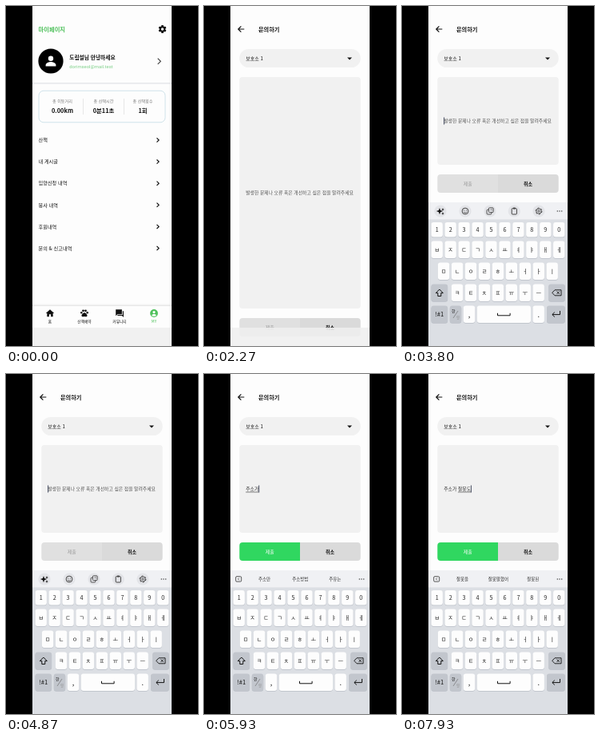
An HTML page for the animation above (8 s loop, 240x426 px).

```html
<!DOCTYPE html>
<html lang="ko">
<head>
<meta charset="utf-8">
<title>문의하기</title>
<style>
html, body { margin: 0; width: 100%; height: 100%; overflow: hidden; background: #000; }
svg { display: block; width: 240px; height: 426px; }
text { font-family: "Noto Sans CJK KR", "Noto Sans CJK JP", "Noto Sans CJK", sans-serif; white-space: pre; }
.latin { font-family: Roboto, "Open Sans", sans-serif; }
</style>
</head>
<body>
<svg id="stage" viewBox="0 0 240 426" xmlns="http://www.w3.org/2000/svg"></svg>
<script>
const LOOP = 8000;
const INK = '#111', GREEN = '#4fc15c', ACTIVE = '#30d760', FIELD = '#f1f1f1';

// ---- drawing helpers ----
const rect = (x, y, w, h, fill, r = 0, more = '') =>
  `<rect x="${x}" y="${y}" width="${w}" height="${h}" rx="${r}" fill="${fill}" ${more}/>`;
const circle = (x, y, r, fill, more = '') =>
  `<circle cx="${x}" cy="${y}" r="${r}" fill="${fill}" ${more}/>`;
const line = (d, color = INK, w = 1, more = '') =>
  `<path d="${d}" fill="none" stroke="${color}" stroke-width="${w}" ${more}/>`;
const shape = (d, fill = INK, more = '') => `<path d="${d}" fill="${fill}" ${more}/>`;
const at = (x, y, body, id = '') => `<g ${id && `id="${id}"`} transform="translate(${x} ${y})">${body}</g>`;
// y is the optical middle of the line
const label = (s, x, y, size, { color = INK, weight = 400, anchor = 'start', id = '', cls = '' } = {}) =>
  `<text ${id && `id="${id}"`} class="${cls}" x="${x}" y="${(y + size * .37).toFixed(2)}" font-size="${size}" ` +
  `fill="${color}" font-weight="${weight}" text-anchor="${anchor}">${s.replace('&', '&amp;')}</text>`;
const mid = (s, x, y, size, o = {}) => label(s, x, y, size, { anchor: 'middle', ...o });
const chevron = (x, y, s = 2.6, w = 1.2, color = INK) =>
  line(`M${x - s / 2} ${y - s}l${s} ${s}l${-s} ${s}`, color, w);
const backArrow = line('M50.3 29H43M46.4 25.4L42.8 29l3.6 3.6', INK, 1.2);
const page = (id, body) => `<g id="${id}">${rect(33, 0, 174, 426, '#fdfdfd')}${body}</g>`;

function gear(x, y) {
  let teeth = '';
  for (let a = 0; a < 360; a += 60)
    teeth += rect(-1.3, -4.9, 2.6, 4, INK, .5, `transform="rotate(${a})"`);
  return at(x, y, teeth + circle(0, 0, 3.7, INK) + circle(0, 0, 1.7, '#fdfdfd'));
}

// ---- pages ----
function homePage() {
  const stats = [['총 이동거리', '0.00km', 70.5], ['총 산책시간', '0분11초', 122], ['총 산책횟수', '1회', 171]];
  const menu = ['산책', '내 게시글', '입양신청 내역', '봉사 내역', '후원내역', '문의 & 신고내역'];
  const home = shape('M0-4.8L5.2 0H3.7V4.2H1.1V1.2H-1.1V4.2H-3.7V0H-5.2z');
  const paw = circle(-3.7, -.7, 1.3, INK) + circle(-1.5, -3.2, 1.4, INK) + circle(1.5, -3.2, 1.4, INK) +
    circle(3.7, -.7, 1.3, INK) + shape('M0-.8C1.6-.8 3.9 1.8 3.5 3.3C3 5 1.2 4 0 4S-3 5-3.5 3.3C-3.9 1.8-1.6-.8 0-.8z');
  const chat = shape('M-4.8-4.7H2.9V1.2H-2.8L-4.8 3.2z') + shape('M3.8-2.8H5V4.9L3 3H-2.7V2H3.8z');
  const me = circle(0, 0, 4.9, GREEN) + circle(0, -1.4, 1.6, '#fdfdfd') + shape('M-3 2.5C-2 .4 2 .4 3 2.5C1.5 4.3-1.5 4.3-3 2.5z', '#fdfdfd');
  const tabs = [['홈', 55, home], ['산책예약', 98, paw], ['커뮤니티', 142, chat], ['MY', 185, me]];

  return page('home',
    label('마이페이지', 40.5, 29, 7.3, { color: GREEN, weight: 700 }) + gear(195.5, 29) +
    circle(56, 69, 15.6, '#000') + circle(56, 65.7, 3.2, '#fff') +
    shape('M49.6 75.6V74c0-2.6 4.2-3.9 6.4-3.9s6.4 1.3 6.4 3.9v1.6z', '#fff') +
    label('도림설님 안녕하세요', 79.3, 64.6, 6.7, { weight: 700 }) +
    label('dorimseol@mail.test', 79.3, 75.4, 5.9, { color: '#7fd08a', cls: 'latin' }) +
    chevron(191.5, 69.3, 3.6, 1.2, '#444') +
    rect(33, 96.4, 174, 1, '#d9dde2') +
    rect(41, 106.2, 158, 39.6, '#fdfdfd', 6, 'stroke="#cfe3ea" stroke-width="1"') +
    rect(96, 116, .7, 20, '#ddd') + rect(147, 116, .7, 20, '#ddd') +
    stats.map(([k, v, x]) => mid(k, x, 119, 5.1, { color: '#777' }) + mid(v, x, 131.3, 7.4, { weight: 700 })).join('') +
    menu.map((s, i) => label(s, 40.5, 168 + i * 27.1, 6.2) + chevron(189.8, 168 + i * 27.1)).join('') +
    rect(33, 373.5, 174, 3, '#f3f3f3') + rect(33, 375.2, 174, 1, '#e4e4e4') + rect(33, 376, 174, 28, '#fdfdfd') +
    tabs.map(([s, x, icon], i) => at(x, 385, icon) +
      mid(s, x, 395.4, 4.7, { color: i === 3 ? GREEN : INK, weight: 500 })).join(''));
}

const settingsPage = () => page('settings',
  backArrow + label('설정', 68, 29, 7.2, { weight: 700 }) +
  label('알림설정', 44.5, 60, 6, { weight: 700 }) +
  label('누비로개의 모든 알림을 설정해요', 45.5, 73.7, 5, { color: '#a8a8a8' }) +
  rect(168.3, 52, 25.6, 15.8, '#000', 7.9) + circle(185.9, 59.9, 6, '#fff') +
  label('위치설정', 44.5, 104.7, 6.1) + chevron(189.2, 104.7, 2.8, 1.3) +
  label('문의하기', 44.5, 135.6, 6.1) + chevron(189.2, 135.6, 2.8, 1.3));

const inquiryPage = () => page('inquiry',
  backArrow + label('문의하기', 68, 29, 7.2, { weight: 700 }) +
  rect(44.3, 54, 151.4, 23, FIELD, 11.5) + label('보호소 1', 52.3, 65.6, 6, { weight: 500 }) +
  shape('M179 64.4h6l-3 3z') +
  rect(44.3, 89, 151.4, 290, FIELD, 4, 'id="area"') +
  at(0, 234,
    label('발생한 문제나 오류 혹은 개선하고 싶은 점을 알려주세요', 52.2, 0, 5.83, { color: '#555', id: 'hint' }) +
    label('', 52.2, 0, 5.83, { color: '#333', id: 'typed' }) +
    rect(52, 3.7, 0, .6, '#333', 0, 'id="underline"') +
    rect(52, -4.5, 1, 9, '#4a5064', 0, 'id="caret"'), 'entry') +
  at(0, 391,
    shape('M48.3 0H120V23H48.3a4 4 0 0 1-4-4V4a4 4 0 0 1 4-4z', '#e0e0e0', 'id="send"') +
    shape('M120 0H191.7a4 4 0 0 1 4 4V19a4 4 0 0 1-4 4H120z', '#dadada') +
    mid('제출', 82.3, 11.6, 6, { color: '#9a9a9a', weight: 500, id: 'sendLabel' }) +
    mid('취소', 157.5, 11.6, 6, { weight: 700 }), 'buttons'));

// ---- keyboard, in coordinates of its resting place ----
const PITCH = 16.95, KEY_W = 14.4;
const ROWS = [
  { keys: '1234567890', x: 43.7, y: 271, h: 18.5 },
  { keys: 'ㅂㅈㄷㄱㅅㅛㅕㅑㅐㅔ', x: 43.7, y: 294.5, h: 21.5 },
  { keys: 'ㅁㄴㅇㄹㅎㅗㅓㅏㅣ', x: 52.1, y: 321.5, h: 21.5 },
  { keys: 'ㅋㅌㅊㅍㅠㅜㅡ', x: 69, y: 348.5, h: 21.5 }
];
const keyAt = {};
const cap = (x, y, w, h, fill = '#fdfdfd') =>
  rect(x, y + .7, w, h, '#b9bec6', 3) + rect(x, y, w, h, fill, 3);

function keyboard() {
  const dim = '#c2c6cd', grey = '#444';
  let keys = '';
  for (const { keys: row, x, y, h } of ROWS)
    [...row].forEach((k, i) => {
      const cx = x + i * PITCH;
      keyAt[k] = { x: cx, y, h };
      keys += cap(cx - KEY_W / 2, y, KEY_W, h) + mid(k, cx, y + h / 2, 7.2, { color: '#222' });
    });
  keys += cap(36.5, 348.5, 20.6, 21.5, dim) + cap(183.2, 348.5, 20.6, 21.5, dim) +
    cap(36.5, 375.5, 20.6, 21.5, dim) + cap(59.8, 375.5, KEY_W, 21.5, dim) +
    cap(76.8, 375.5, KEY_W, 21.5) + cap(93.8, 375.5, 67.2, 21.5) +
    cap(163.5, 375.5, KEY_W, 21.5) + cap(181, 375.5, 22.8, 21.5, dim) +
    line('M46.8 355l4.5 4.6h-2.5v3.9h-4v-3.9h-2.5z', INK, 1, 'stroke-linejoin="round"') +
    line('M191 355.8h8v7h-8l-3.3-3.5zM193.5 357.6l3.4 3.4M196.9 357.6l-3.4 3.4', INK, .9) +
    mid('!#1', 46.8, 386.4, 7.6, { weight: 500 }) +
    mid('한', 64.2, 382.5, 5) + mid('영', 70, 390.5, 4.2, { color: '#888' }) + line('M64 391l6-9', '#666', .6) +
    mid(',', 84, 386.5, 9) + mid('.', 170.7, 386.5, 9) +
    line('M119.5 384.8v3h15.6v-3', INK, 1) +
    line('M197.5 382v4.6h-9.5M190.8 383.7l-3 2.9l3 2.9', INK, 1);

  const tools = [48, 79, 110, 140.3, 171].map(x => circle(x, 257, 7.6, '#e3e4e8')).join('') +
    shape('M47 253l1.1 3l3 1.1l-3 1.1l-1.1 3l-1.1-3l-3-1.1l3-1.1zM51 253l.5 1.4l1.4.5l-1.4.5l-.5 1.4l-.5-1.4l-1.4-.5l1.4-.5zM51 258.3l.5 1.3l1.3.5l-1.3.5l-.5 1.3l-.5-1.3l-1.3-.5l1.3-.5z') +
    circle(79, 257, 3.9, 'none', `stroke="${grey}"`) + circle(77.6, 256, .6, grey) + circle(80.4, 256, .6, grey) +
    line('M77 258.2q2 2 4 0', grey, .8) +
    rect(106, 255.2, 5.8, 5.8, 'none', 1, `stroke="${grey}" stroke-width=".9"`) +
    rect(108.4, 252.8, 5.8, 5.8, '#e3e4e8', 1, `stroke="${grey}" stroke-width=".9"`) + mid('가', 111.3, 255.7, 3.6, { color: grey }) +
    rect(137.2, 253.6, 6.2, 7.4, 'none', 1, `stroke="${grey}"`) + rect(138.8, 252.6, 3, 2, grey, .5) +
    circle(171, 257, 3.2, 'none', `stroke="${grey}" stroke-width=".9"`) + circle(171, 257, 1.2, 'none', `stroke="${grey}" stroke-width=".8"`) +
    circle(171, 257, 3.9, 'none', `stroke="${grey}" stroke-width="1" stroke-dasharray="2 2.084"`);

  const words = rect(39.7, 253.7, 7, 6.4, 'none', 1.2, `stroke="${grey}" stroke-width=".9"`) +
    line('M44 255.4l-1.5 1.5l1.5 1.5', grey, .8) +
    [75.5, 120.3, 163.8].map((x, i) => mid('', x, 257, 5.5, { color: '#333', id: 'word' + i })).join('');

  return at(0, 180,
    rect(33, 246, 174, 181, '#dcdfe4') + rect(33, 246, 174, 21.3, '#f0f1f4') + keys +
    `<g id="tools">${tools}</g><g id="words">${words}</g>` +
    [194.3, 197, 199.7].map(x => circle(x, 257, .75, grey)).join('') +
    at(0, 0, rect(-KEY_W / 2, 41.5, KEY_W, 21.5, '#000', 3, 'opacity=".1"') +
      rect(-12.3, .9, 24.6, 38.6, '#a9aeb6', 4) + rect(-12.3, .2, 24.6, 38.6, '#fdfdfd', 4) +
      mid('', 0, 19, 11, { id: 'popupKey' }), 'popup'), 'keyboard');
}

document.getElementById('stage').innerHTML =
  `<clipPath id="phone">${rect(33, 0, 174, 426, '#fff')}</clipPath>` + rect(0, 0, 240, 426, '#000') +
  `<g clip-path="url(#phone)">${homePage()}${settingsPage()}${inquiryPage()}` +
  rect(33, 403, 174, 23, '#efefef', 0, 'opacity=".88"') + keyboard() + '</g>';

// ---- motion ----
const $ = {};
document.querySelectorAll('[id]').forEach(el => $[el.id] = el);
const show = (el, on) => el.style.display = on ? '' : 'none';
const clamp = v => Math.max(0, Math.min(1, v));

// press, release, key, text after release
const TYPING = [
  [4930, 5030, 'ㅈ', 'ㅈ'], [5130, 5230, 'ㅜ', '주'],
  [5470, 5560, 'ㅅ', '줏'], [5600, 5660, 'ㅗ', '주소'], [5700, 5770, 'ㄱ', '주속'], [5820, 5900, 'ㅏ', '주소가'],
  [5950, 6000, ' ', '주소가 '], [6060, 6120, 'ㅈ', '주소가 ㅈ'], [6180, 6260, 'ㅏ', '주소가 자'],
  [6330, 6400, 'ㄹ', '주소가 잘'], [6460, 6530, 'ㅁ', '주소가 잚'], [6590, 6670, 'ㅗ', '주소가 잘모'],
  [6870, 6990, 'ㅅ', '주소가 잘못'],
  [7530, 7660, 'ㄷ', '주소가 잘못ㄷ'], [7720, 7800, 'ㅗ', '주소가 잘못도']
];
const WORDS = [
  [5470, '주', '주소', '주말에'], [5660, '주소', '주소를', '주소는'], [5900, '주소만', '주소방법', '주유는'],
  [6260, '자', '자꾸', '자주'], [6400, '잘', '잘못', '잘하는'], [6670, '잘모', '잘모르는', '잘못'],
  [6990, '잘못', '잘못된', '잘못이'], [7800, '잘못을', '잘못말했어', '잘못된']
];
const CARET_OFF = [[0, 2900], [3270, 3800], [4330, 4865]];

function setPage(el, alpha, scale) {
  show(el, alpha > 0);
  el.setAttribute('opacity', alpha);
  el.setAttribute('transform', `translate(120 213) scale(${scale}) translate(-120 -213)`);
}

function drawPages(t) {
  const pages = [$.home, $.settings, $.inquiry];
  const progress = [1, clamp((t - 715) / 345), clamp((t - 1915) / 345), 0];
  pages.forEach((el, i) => {
    const enter = progress[i], leave = progress[i + 1];
    const grow = .9 + .1 * (1 - (1 - enter) ** 3);
    setPage(el, leave === 1 ? 0 : clamp((enter - .05) / .45), grow + .02 * leave);
  });
}

function drawLayout(t) {
  const top = 246 + 180 * (1 - clamp((t - 2850) / 470)) ** 2.35;
  const buttons = t >= 3800 ? 211 : Math.min(391, top - 10.7);
  const bottom = buttons - 12;
  $.keyboard.setAttribute('transform', `translate(0 ${top - 246})`);
  show($.keyboard, top < 426);
  $.area.setAttribute('height', bottom - 89);
  $.entry.setAttribute('transform', `translate(0 ${(89 + bottom) / 2})`);
  $.buttons.setAttribute('transform', `translate(0 ${buttons})`);
}

function drawTyping(t) {
  const last = TYPING.filter(k => t >= k[1]).pop();
  const text = last ? last[3] : '';
  const width = s => { $.typed.textContent = s; return s ? $.typed.getComputedTextLength() : 0; };
  const start = width(text.slice(0, text.lastIndexOf(' ') + 1)), end = width(text);
  show($.hint, !text);
  $.underline.setAttribute('x', 52.2 + start);
  $.underline.setAttribute('width', Math.max(0, end - start));
  $.caret.setAttribute('x', 52.1 + end);
  show($.caret, !CARET_OFF.some(([a, b]) => t >= a && t < b));
  $.send.setAttribute('fill', text ? ACTIVE : '#e0e0e0');
  $.sendLabel.setAttribute('fill', text ? '#fff' : '#9a9a9a');

  const words = WORDS.filter(w => t >= w[0]).pop();
  show($.tools, !words);
  show($.words, words);
  if (words) for (let i = 0; i < 3; i++) $['word' + i].textContent = words[i + 1];

  const down = TYPING.find(k => t >= k[0] && t < k[1]);
  const key = down && keyAt[down[2]];
  show($.popup, key);
  if (key) {
    $.popup.setAttribute('transform', `translate(${key.x} ${key.y - 41.5})`);
    $.popupKey.textContent = down[2];
  }
}

function frame() {
  const t = performance.now() % LOOP;
  drawPages(t);
  drawLayout(t);
  drawTyping(t);
  requestAnimationFrame(frame);
}
frame();
</script>
</body>
</html>
```
